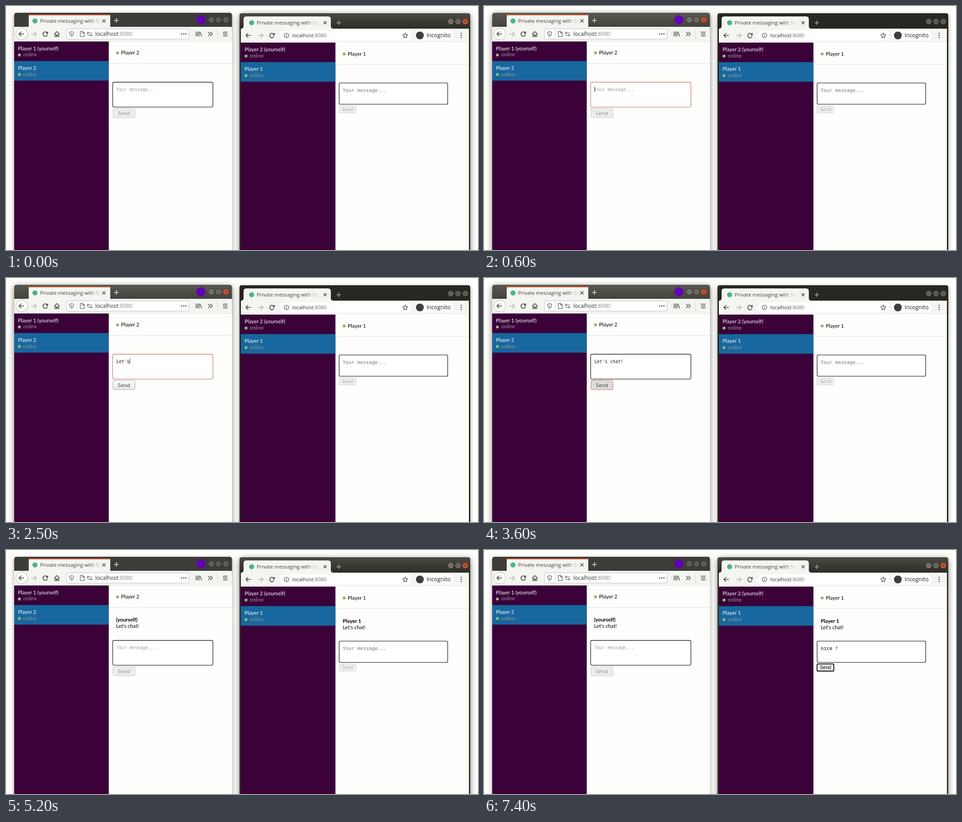
Recreate the animation shown at these times as an HTML page. Size 1039x539 px, loop 8 s.

```html
<!DOCTYPE html>
<html lang="en">
<head>
<meta charset="utf-8">
<title>Private messaging</title>
<style>
html, body { margin: 0; width: 100%; height: 100%; overflow: hidden; background: #fefefb; }
svg { display: block; width: 1039px; height: 539px; }
text { white-space: pre; }
</style>
</head>
<body>
<svg id="stage" viewBox="0 0 1039 539"></svg>
<script>
const LOOP = 8000;
const LATO = "Lato, sans-serif", UI = "'Open Sans', sans-serif";
const MONO = "'DejaVu Sans Mono', monospace", ARIAL = "'Liberation Sans', Arial, sans-serif";
const PAGE = '#fefefc', BAR = '#f4f4f1', INK = '#3f403d', PALE = '#b4b4b0';

// [time, value] pairs; the latest one reached applies
const leftTyping = [[0, ''], [1300, 'L'], [1500, 'Le'], [1600, 'Let'], [1700, 'Lets'], [1800, 'Let'],
  [2300, "Let'"], [2500, "Let's"], [2600, "Let's "], [2700, "Let's c"], [2900, "Let's cha"],
  [3000, "Let's chat"], [3200, "Let's chat!"], [3900, '']];
const rightTyping = [[0, ''], [6300, 'ni'], [6500, 'nice'], [6600, 'nice '], [6800, 'nice !']];
const at = (steps, t) => steps.filter(s => s[0] <= t).pop()[1];
const within = (t, from, to) => t >= from && t < to;

const rect = (x, y, w, h, fill, more = '') =>
  `<rect x="${x}" y="${y}" width="${w}" height="${h}" fill="${fill}" ${more}/>`;
const circle = (x, y, r, fill, more = '') =>
  `<circle cx="${x}" cy="${y}" r="${r}" fill="${fill}" ${more}/>`;
const line = (d, color = INK, width = 1.4, fill = 'none') =>
  `<path d="${d}" fill="${fill}" stroke="${color}" stroke-width="${width}"/>`;
const text = (x, y, s, size, fill, font, more = '') =>
  `<text x="${x}" y="${y}" font-size="${size}" font-family="${font}" fill="${fill}" ${more}>${s}</text>`;
const label = (x, y, s, fill, more) => text(x, y, s, 11.4, fill, LATO, more);
const gradient = (id, top, bottom) =>
  `<linearGradient id="${id}" x2="0" y2="1"><stop stop-color="${top}"/><stop offset="1" stop-color="${bottom}"/></linearGradient>`;

const cross = (x, y, r, color = INK, width = 1.4) =>
  line(`M${x - r} ${y - r}l${2 * r} ${2 * r}m0 ${-2 * r}l${-2 * r} ${2 * r}`, color, width);
const plus = (x, y, color) => line(`M${x - 5} ${y}h10m-5-5v10`, color, 1.5);
const arrow = (x, y, dir, color) =>
  line(`M${x - 5 * dir} ${y}h${11 * dir}m${-5 * dir}-5l${5 * dir} 5l${-5 * dir} 5`, color, 1.6);
const reload = (x, y) =>
  line(`M${x + 3.8} ${y - 3}A5 5 0 1 0 ${x + 4.8} ${y + 1.6}`, INK, 1.6) +
  `<path d="M${x + 6} ${y - 6}v5.5h-5.5z" fill="${INK}"/>`;

function windowButtons(x, y, focused) {
  const glyph = focused ? '#383732' : '#42413c';
  const disc = (cx, fill) => circle(cx, y, 6.3, fill, 'stroke="#33322e" stroke-width=".8"');
  const grey = focused ? '#7c7b72' : '#65645d';
  return disc(x, grey) + disc(x + 16, grey) + disc(x + 32, focused ? '#e2552f' : grey) +
    line(`M${x - 3} ${y}h6`, glyph, 1.1) +
    line(`M${x + 13.5} ${y - 2.5}h5v5h-5z`, glyph, 1.1) + cross(x + 32, y, 2.3, glyph, 1.1);
}

function tabTitle(x, y, id) {
  return `<linearGradient id="${id}" gradientUnits="userSpaceOnUse" x1="${x + 108}" x2="${x + 136}">
    <stop stop-color="${INK}"/><stop offset="1" stop-color="${INK}" stop-opacity="0"/></linearGradient>` +
    circle(x - 11.3, y - 4, 5.6, '#41b883') +
    text(x, y, 'Private messaging with Soc', 11.2, `url(#${id})`, UI);
}

const shadow = (x, y, w, focused) =>
  rect(x, y + 3, w, 560, '#000', `rx="6" opacity="${focused ? .5 : .38}" style="filter:blur(${focused ? 7 : 5}px)"`);

function leftBrowser(focused) {
  return gradient('titleL', '#58574f', '#3d3c38') + shadow(18, 15, 479.5, focused) +
    rect(18, 15, 479.5, 540, focused ? 'url(#titleL)' : '#3d3c37', 'rx="5"').replace('height="540"', 'height="40"') +
    rect(50, 19, 179.5, 28, BAR) + rect(50, 19, 179.5, 1.8, '#e8703f') +
    tabTitle(75, 37, 'fadeL') + cross(215.5, 33, 3.6) + plus(243, 32, '#e4e3df') +
    circle(429, 30.3, 10, '#6200b8') + windowButtons(452, 30.3, focused) +
    rect(18, 46, 479.5, 32.5, BAR) +
    circle(34.5, 61.7, 13, '#fcfcfa', 'stroke="#b3b3af" stroke-width="1"') +
    arrow(34.5, 61.7, -1, INK) + arrow(61, 61.7, 1, PALE) + reload(86.5, 61.7) +
    line('M106 62.5l6-6 6 6M108 61.5v6h3v-4h2v4h3v-6', INK, 1.5) +
    rect(133, 50.5, 270, 22.5, '#fff', 'rx="2.5" stroke="#bfbfbb"') +
    line('M144.5 56.5l4.5 1.4c0 5-1.5 7.5-4.5 9.2c-3-1.7-4.5-4.2-4.5-9.2zM144.5 59v5.5', '#5b5b58', 1.2) +
    line('M156.5 53v18', '#d0d0cc', 1) +
    line('M163.5 56.3h5.5l3.5 3.5v7.5h-9zM168.7 56.5v3.5h3.5', '#5b5b58', 1.2) +
    line('M182.5 59.5h7M178.5 64.5h6.5', '#5b5b58', 1.2) +
    circle(180.3, 59.5, 1.7, 'none', 'stroke="#5b5b58" stroke-width="1.2"') +
    circle(187.3, 64.5, 1.7, 'none', 'stroke="#5b5b58" stroke-width="1.2"') +
    text(196.4, 66, 'localhost<tspan fill="#8a8a87">:8080</tspan>', 12.2, '#2d2d2b', UI) +
    [386.5, 391.2, 396].map(x => circle(x, 61.8, 1.5, '#5b5b58')).join('') +
    line('M418.5 56.5v10.5M421.8 56.5v10.5M425 56.5v10.5M427 57l3.7 10', INK, 1.4) +
    line('M445 57.2l4.3 4.5l-4.3 4.5M450 57.2l4.3 4.5l-4.3 4.5', INK, 1.4) +
    line('M465.5 51v22', '#d6d6d2', 1) +
    line('M477.5 57.7h10M477.5 61.7h10M477.5 65.7h10', INK, 1.4);
}

function rightBrowser(focused) {
  return gradient('titleR', '#4b4a43', '#2b2c27') + shadow(514, 16, 508, focused) +
    rect(514, 16, 508, 540, focused ? '#33332e' : '#272823', 'rx="5"') +
    rect(514, 16, 508, 36, focused ? 'url(#titleR)' : '#272823', 'rx="5"') +
    `<path d="M517 50c4 0 6-2 6-6v-15q0-6 6-6h180q6 0 6 6v15c0 4 2 6 6 6z" fill="${BAR}"/>` +
    tabTitle(552, 41, 'fadeR') + cross(702.3, 37, 3.2) + plus(732.5, 37, '#a9a9a3') +
    windowButtons(979, 34.3, focused) + rect(517, 50, 502, 31, BAR) +
    arrow(534, 65, -1, INK) + arrow(560, 65, 1, PALE) + reload(585.5, 65) +
    rect(603, 53.5, 290, 23, '#fff', 'rx="11.5"') +
    circle(617.3, 65, 5, 'none', `stroke="${INK}" stroke-width="1.1"`) +
    line('M617.3 64.2v3.6M617.3 61.8v1.3', INK, 1.2) +
    text(630.3, 69, 'localhost<tspan fill="#6b6b68">:8080</tspan>', 11.1, '#2d2d2b', UI) +
    line('M879 59.5l1.6 3.7l4 .4l-3 2.7l.9 3.9l-3.5-2l-3.5 2l.9-3.9l-3-2.7l4-.4z', INK, 1.1) +
    rect(899, 54, 87, 22, '#fff', 'rx="11"') + circle(911, 65, 8.7, '#3c4043') +
    text(925.7, 69.2, 'Incognito', 12.2, '#1c1c1c', UI) +
    [60.2, 65, 69.8].map(y => circle(1002, y, 1.3, INK)).join('');
}

function chat(x, y, width, me, other, sender, sent) {
  const user = (top, name) =>
    label(x + 8.2, top + 19.1, name, '#fff') + circle(x + 11.4, top + 29.8, 3.3, '#86bb71') +
    label(x + 19.6, top + 33, 'online', '#92959e');
  return rect(x, y, width, 480, PAGE) + rect(x, y, 208.2, 480, '#3a0238') +
    rect(x, y + 43.2, 208.2, 43.2, '#17679e') +
    user(y, `${me} (yourself)`) + user(y + 43.2, other) +
    rect(x + 208.2, y + 47.8, width - 208.2, .9, '#dadad8') +
    circle(x + 227.5, y + 25.2, 3.3, '#86bb71') + label(x + 235.2, y + 28.8, other, '#000') +
    (sent ? label(x + 224.2, y + 80, sender, '#000', 'font-weight="700"') +
      label(x + 224.2, y + 93.7, "Let's chat!", '#000') : '');
}

function message(x, y, typed, size, color, hint, caret) {
  const end = x + typed.length * size * .602;
  return text(x, y, typed || 'Your message...', size, typed ? color : hint, MONO) +
    (caret ? rect(end, y - 9.6, .9, 11.6, '#000') : '');
}

function leftForm(t, dy) {
  const typed = at(leftTyping, t), focus = within(t, 600, 3600), pressed = within(t, 3600, 3900);
  const caret = focus && !within(t, 2200, 2300);
  const fill = pressed ? '#dcdcda' : typed ? 'url(#button)' : '#ededec';
  const edge = pressed ? '#c4765f' : typed ? '#a9a9a6' : '#c6c6c4';
  return gradient('button', '#fcfcfb', '#e6e6e4') + `<g transform="translate(0 ${dy})">` +
    rect(234.8, 168.4, 220.7, 54.9, '#fff', `rx="3.2" stroke="${focus ? '#b96f5b' : '#000'}" stroke-width="1.1"`) +
    message(243, 188, typed, 9.6, '#1b1b1b', '#9b9b99', caret) +
    rect(235.5, 226, 48.3, 20.7, fill, `rx="3" stroke="${edge}"`) +
    text(259.6, 241, 'Send', 11.6, typed ? '#363636' : '#8d8d8a', UI, 'text-anchor="middle"') + '</g>';
}

function rightForm(t, dy) {
  const typed = at(rightTyping, t), focus = within(t, 5600, 7400), clicked = t >= 7400;
  const inset = focus ? .4 : 0;
  return `<g transform="translate(0 ${dy})">` +
    rect(733.3 + inset, 170 + inset, 239 - 2 * inset, 47 - 2 * inset, '#fff',
      `rx="2.6" stroke="#000" stroke-width="${focus ? 2 : 1.1}"`) +
    message(741.3, 190, typed, 10.67, '#000', '#757575', focus && !within(t, 6200, 6300)) +
    rect(733.2, 220.5, 36.8, 15.8, '#efefef',
      `rx="1.8" stroke="${clicked ? '#000' : typed ? '#767676' : '#cbcbc9'}" stroke-width="${clicked ? 1.8 : .9}"`) +
    text(751.6, 232.3, 'Send', 10.67, typed ? '#000' : '#b0b0ae', ARIAL, 'text-anchor="middle"') + '</g>';
}

function scene(t) {
  const leftActive = within(t, 200, 5200), sent = t >= 3900, dy = sent ? 31.2 : 0;
  return rect(0, 0, 1039, 539, '#fefefb') +
    leftBrowser(leftActive) + chat(18, 78.4, 479.5, 'Player 1', 'Player 2', '(yourself)', sent) + leftForm(t, dy) +
    rightBrowser(!leftActive) + chat(517, 80.8, 502, 'Player 2', 'Player 1', 'Player 1', sent) + rightForm(t, dy);
}

const stage = document.getElementById('stage');
let shown = '';
function draw(now) {
  const next = scene(now % LOOP);
  if (next !== shown) stage.innerHTML = shown = next;
  requestAnimationFrame(draw);
}
draw(performance.now());
</script>
</body>
</html>
```
